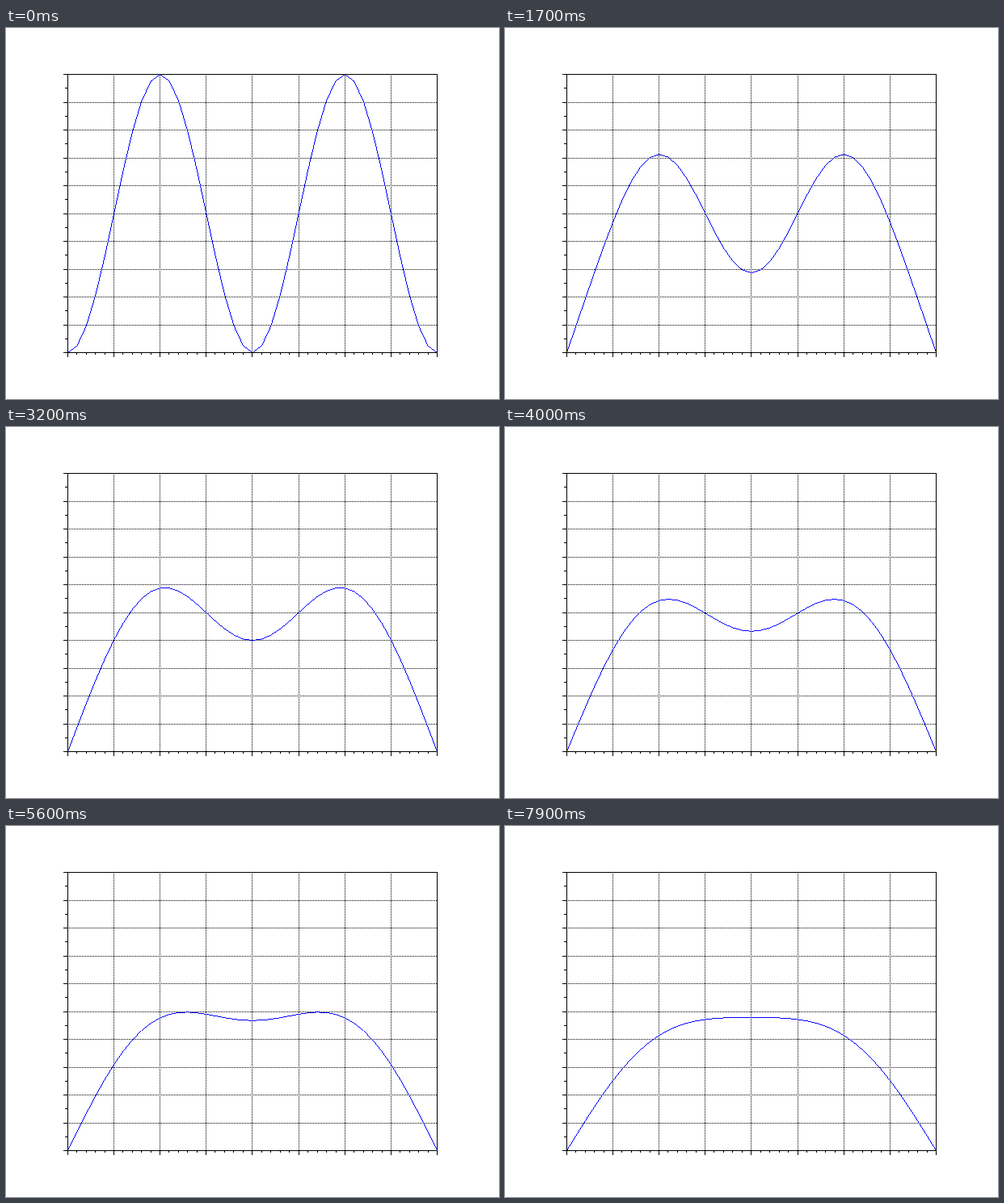
These frames come from a looping animation (610 px wide and 460 px high, 8 s). A matplotlib script:

```python
import numpy as np
import matplotlib.pyplot as plt
from matplotlib.animation import FuncAnimation

W, H = 610, 460
LEFT, RIGHT, TOP, BOTTOM = 76, 533, 57, 402
FRAMES, CELLS = 80, 40
BLACK, BLUE = (0, 0, 0), (0, 0, 255)


def to_pixel(v):
    """Round to the nearest pixel, halves going down."""
    return np.ceil(np.asarray(v) - 0.5).astype(int)


def columns(parts):
    return LEFT + to_pixel(np.linspace(0, RIGHT - LEFT, parts + 1))


def rows_up(parts):
    return BOTTOM - to_pixel(np.linspace(0, BOTTOM - TOP, parts + 1))


def grid():
    img = np.full((H, W, 3), 255, np.uint8)
    for x in columns(8)[1:-1]:
        img[TOP:BOTTOM:2, x] = BLACK
    for y in rows_up(10)[1:-1]:
        img[y, LEFT:RIGHT:2] = BLACK
    return img


def frame_mask():
    """Solid box with its major and minor ticks."""
    mask = np.zeros((H, W), bool)
    mask[[TOP, BOTTOM], LEFT:RIGHT + 1] = True
    mask[TOP:BOTTOM + 1, [LEFT, RIGHT]] = True
    # Minor ticks split the gap between already rounded major ones.
    ticks = to_pixel(np.interp(np.arange(41), np.arange(0, 41, 5), columns(8)))
    for i, x in enumerate(ticks):
        mask[BOTTOM:BOTTOM + (3 if i % 5 else 6), x] = True
    for i, y in enumerate(rows_up(20)):
        mask[y, LEFT - (3 if i % 2 else 5):LEFT] = True
    return mask


def walk(a0, b0, a1, b1):
    """Pixel centres along axis a, with the matching cells along b."""
    lo, hi = sorted((a0, a1))
    a = np.arange(np.ceil(lo - 0.5), np.ceil(hi - 0.5))
    b = b0 + (a + 0.5 - a0) * (b1 - b0) / (a1 - a0)
    return a.astype(int), np.floor(b).astype(int)


def draw_curve(img, u):
    xs = np.linspace(LEFT, RIGHT, CELLS + 1) + 0.5
    ys = BOTTOM + 0.5 - (BOTTOM - TOP) * u
    for x0, y0, x1, y1 in zip(xs, ys, xs[1:], ys[1:]):
        if abs(y1 - y0) > abs(x1 - x0):
            rows, cols = walk(y0, x0, y1, x1)
        else:
            cols, rows = walk(x0, y0, x1, y1)
        img[rows, cols] = BLUE


def diffuse():
    """Explicit heat equation, ratio 1/2, both ends held at zero."""
    u = np.sin(2 * np.pi * np.linspace(0, 1, CELLS + 1)) ** 2
    states = [u]
    for _ in range(FRAMES - 1):
        u = np.concatenate(([0], (u[:-2] + u[2:]) / 2, [0]))
        states.append(u)
    return states


background, box, states = grid(), frame_mask(), diffuse()


def render(i):
    img = background.copy()
    draw_curve(img, states[i])
    img[box] = BLACK
    return img


DPI = 80
fig = plt.figure(figsize=(W / DPI, H / DPI), dpi=DPI, facecolor="white")
picture = fig.figimage(render(0), origin="upper")


def update(i):
    picture.set_data(render(i))
    return [picture]


anim = FuncAnimation(fig, update, frames=FRAMES, interval=100,
                     repeat=True, repeat_delay=0)
plt.show()
```
